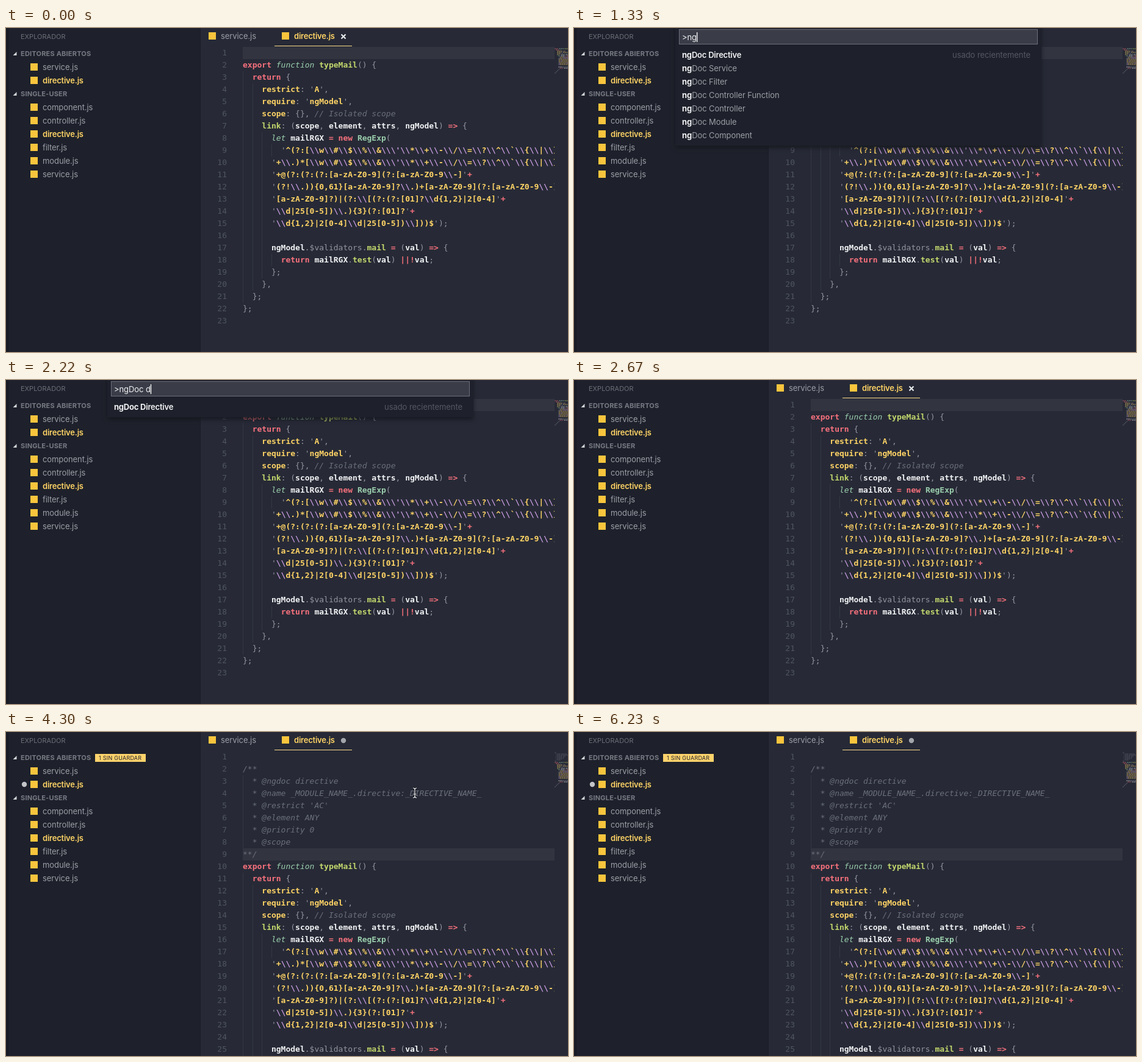
These frames come from a looping animation (921x532 px, 6.35 s). An HTML page:

```html
<!DOCTYPE html>
<html lang="es">
<head>
<meta charset="utf-8">
<title>Editor</title>
<style>
html, body { margin: 0; width: 100%; height: 100%; overflow: hidden; background: #272a36; }
svg { display: block; width: 921px; height: 532px; }
text { white-space: pre; }
.ui { font: 13px Inter, sans-serif; letter-spacing: -.08px; fill: #9c9ea6; }
.on { font-weight: 600; letter-spacing: -.22px; }
.cap { font: 11px Inter, sans-serif; fill: #6c6f78; }
.head { font: 700 11px Inter, sans-serif; letter-spacing: .2px; fill: #777a83; }
.badge { font: 9px Inter, sans-serif; letter-spacing: .25px; fill: #22242c; }
.key { font: 11px Inter, "DejaVu Sans", sans-serif; fill: #e4e5e8; text-anchor: middle; }
.code { font: 13px "DejaVu Sans Mono", monospace; }
.num { fill: #505462; text-anchor: end; }
</style>
</head>
<body>
<svg id="stage" viewBox="0 0 921 532" xmlns="http://www.w3.org/2000/svg">
  <defs>
    <clipPath id="view"><rect x="386" y="31" width="513" height="501"/></clipPath>
    <filter id="shade" x="-10%" y="-30%" width="120%" height="180%" color-interpolation-filters="sRGB">
      <feDropShadow dx="0" dy="4" stdDeviation="3.5" flood-color="#15171e" flood-opacity=".9"/>
    </filter>
  </defs>
  <rect width="921" height="532" fill="#272a36"/>
  <rect width="319" height="532" fill="#1e212b"/>
  <rect width="4.5" height="532" fill="#191b24"/>
  <rect x="318" width="1" height="532" fill="#1a1d26"/>
  <g id="side"></g>
  <g id="tabs"></g>
  <g id="editor"></g>
  <g id="caret"></g>
  <g id="palette"></g>
  <g id="mouse"></g>
</svg>
<script>
const LOOP = 6350;
const COL = 7.826, LEFT = 388, ROW = 20;
const C = {
  red: '#f7717d', green: '#9bcfae', lime: '#c3d76c', yellow: '#ffd466',
  white: '#f1f2f4', gray: '#9396a0', purple: '#c79be0', note: '#6b6f7b'
};

const code = String.raw`
export function typeMail() {
  return {
    restrict: 'A',
    require: 'ngModel',
    scope: {}, // Isolated scope
    link: (scope, element, attrs, ngModel) => {
      let mailRGX = new RegExp(
        '^(?:[\\w\\#\\$\\%\\&\\\'\\*\\+\\-\\/\\=\\?\\^\\~\\{\\|\\}
      '+\\.)*[\\w\\#\\$\\%\\&\\\'\\*\\+\\-\\/\\=\\?\\^\\~\\{\\|\\}
      '+@(?:(?:(?:[a-zA-Z0-9](?:[a-zA-Z0-9\\-]'+
      '(?!\\.)){0,61}[a-zA-Z0-9]?\\.)+[a-zA-Z0-9](?:[a-zA-Z0-9\\-]
      '[a-zA-Z0-9]?)|(?:\\[(?:(?:[01]?\\d{1,2}|2[0-4]'+
      '\\d|25[0-5])\\.){3}(?:[01]?'+
      '\\d{1,2}|2[0-4]\\d|25[0-5])\\]))$');

      ngModel.$validators.mail = (val) => {
        return mailRGX.test(val) ||!val;
      };
    },
  };
};
`.replace(/~/g, '\x60').split('\n');

const doc = `/**
  * @ngdoc directive
  * @name _MODULE_NAME_.directive:_DIRECTIVE_NAME_
  * @restrict 'AC'
  * @element ANY
  * @priority 0
  * @scope
**/`.split('\n');

const documented = [code[0], ...doc, ...code.slice(1)];

const items = [
  ['ngDoc Directive'], ['ngDoc Service'], ['ngDoc Filter'],
  ['ngDoc Controller Function'], ['ngDoc Controller'],
  ['ESLint: Fix all auto-fixable Problems'],
  ['ngDoc Module'], ['ngDoc Component'],
  ['Preferencias: Tema de color', 'Preferences: Color Theme',
    [['⌘', 662, 22], ['K', 685, 19], ['⌘', 706, 22], ['T', 729, 19]]],
  ['Dar formato al documento', 'Format Document',
    [['⌃', 685, 21], ['⌥', 707, 21], ['B', 729, 19]]]
];

const $ = id => document.getElementById(id);
const esc = s => s.replace(/&/g, '&amp;').replace(/</g, '&lt;');
const text = (x, y, s, cls, extra = '') =>
  `<text x="${x}" y="${y}" class="${cls}" ${extra}>${s}</text>`;
const rect = (x, y, w, h, fill, extra = '') =>
  `<rect x="${x}" y="${y}" width="${w}" height="${h}" fill="${fill}" ${extra}/>`;
const dot = (x, y, r, fill) => `<circle cx="${x}" cy="${y}" r="${r}" fill="${fill}"/>`;

function wordColor(word, isKey) {
  if (/^(export|return|new)$/.test(word)) return C.red;
  if (/^(function|let|RegExp)$/.test(word)) return C.green;
  if (/^(typeMail|link|mail|test)$/.test(word)) return C.lime;
  if (word[0] === '$') return C.gray;
  return isKey ? C.yellow : C.white;
}

// Splits a line into [text, colour, bold, italic] parts.
function tokens(line) {
  if (/^\s*(\/\*|\*)/.test(line)) return [[line, C.note, false, true]];
  const out = [];
  const rule = /(\/\/.*)|('(?:\\.|[^'\\])*'?)|(\$?\w+)(?=(:)?)|(=>|\|\||[=!+])|\s+|./g;
  for (const [all, note, str, word, colon, op] of line.matchAll(rule)) {
    if (note) out.push([all, C.note, false, true]);
    else if (str) {
      for (const part of str.split(/((?:\\.)+|^'|'$)/)) {
        if (!part) continue;
        const color = part === "'" ? C.gray : part[0] === '\\' ? C.purple : C.yellow;
        out.push([part, color, color !== C.gray]);
      }
    } else if (word) {
      const slanted = word === 'function' || word === 'let';
      const color = wordColor(word, colon);
      out.push([all, color, !slanted && color !== C.gray, slanted]);
    } else out.push([all, op ? C.red : C.gray, !!op]);
  }
  return out;
}

function drawEditor(lines, current) {
  let body = '', nums = '', guides = '', mini = '';
  lines.forEach((line, i) => {
    const y = 31 + i * ROW;
    const indent = line ? line.search(/\S/) : (i && lines[i + 1] ? 6 : 0);
    for (let c = 0; c < indent; c += 2)
      guides += rect(Math.round(LEFT + c * COL), y, 1, ROW, '#343843');
    nums += text(362, y + 14, i + 1, 'code num');
    let col = 0, spans = '';
    for (const [s, color, bold, slanted] of tokens(line)) {
      spans += `<tspan fill="${color}"${bold ? ' font-weight="700"' : ''}` +
        `${slanted ? ' font-style="italic"' : ''}>${esc(s)}</tspan>`;
      for (const run of s.matchAll(/\S+/g)) {
        const x = 899 + col + run.index;
        if (x < 921) mini += `<path d="M${x} ${32 + i * 2}h${run[0].length}" stroke="${color}"/>`;
      }
      col += s.length;
    }
    if (line) body += text(LEFT, y + 14, spans, 'code');
  });
  return rect(LEFT, 31 + current * ROW, 511, ROW, '#323540') + guides + nums +
    `<g clip-path="url(#view)">${body}</g>` +
    `<g opacity=".75" stroke-width="1" stroke-dasharray=".7 .3 1.4 .6">${mini}</g>`;
}

const file = (x, y, name, active) =>
  rect(x, y - 6, 12, 12, '#f9c53d') +
  text(x + 20, y + 4.5, name, active ? 'ui on' : 'ui', active ? `style="fill:${C.yellow}"` : '');

function drawSide(dirty, badge) {
  const arrow = y => `<path d="M17.5 ${y - 3}v6h-6z" fill="#d5d6da"/>`;
  let s = text(24, 18, 'EXPLORADOR', 'cap') +
    arrow(42) + text(24, 46, 'EDITORES ABIERTOS', 'head') +
    arrow(108) + text(24, 112, 'SINGLE-USER', 'head') +
    file(40, 64, 'service.js') + file(40, 86, 'directive.js', true);
  ['component', 'controller', 'directive', 'filter', 'module', 'service'].forEach((n, i) =>
    s += file(40, 130 + 22 * i, n + '.js', n === 'directive'));
  if (dirty) s += dot(30, 86, 4.2, '#c3c4c8');
  if (badge) s += rect(146, 36, 83, 13, '#ffd36b') + text(152, 46, '1 SIN GUARDAR', 'badge');
  return s;
}

const drawTabs = dirty =>
  file(332, 13, 'service.js') + file(452, 13, 'directive.js', true) +
  rect(440, 29, 127, 1, '#ffdc8c') +
  (dirty ? dot(553, 14, 4.2, '#a3a5ab')
    : '<path d="M549.5 10.5l7 7m0-7l-7 7" stroke="#f1f2f4" stroke-width="2"/>');

function drawPalette(query, caret) {
  const rows = items.filter(([s]) => s.toLowerCase().startsWith(query.toLowerCase()));
  const n = query.length;
  let y = 33, list = '';
  rows.forEach(([label, detail, keys], i) => {
    const hit = n ? `<tspan font-weight="700" fill="${C.white}">${label.slice(0, n)}</tspan>` : '';
    list += text(177, y + 15.5, hit + label.slice(n), i ? 'ui' : 'ui on',
      i ? '' : `style="fill:${C.white}"`);
    if (!i) list += text(748, y + 15.5, 'usado recientemente', 'ui',
      'text-anchor="end" style="fill:#555862"');
    if (detail) list += text(177, y + 35.5, detail, 'ui', 'style="fill:#686b75"');
    for (const [k, x, w] of keys || [])
      list += rect(x, y + 3, w, 18, '#2c2f39', 'rx="3"') + text(x + w / 2, y + 16, k, 'key');
    y += detail ? 44 : 22;
  });
  $('palette').innerHTML =
    rect(166, -8, 600, y + 14, '#1e212b', 'filter="url(#shade)"') +
    rect(172.5, 2.5, 587, 24, '#3a3d48', 'stroke="#6d707a"') +
    text(177, 19.5, '>' + query, 'ui', `id="query" style="fill:${C.white}"`) + list;
  if (caret)
    $('palette').innerHTML += rect(177 + $('query').getComputedTextLength(), 7, 1.3, 16, '#fff');
}

function drawMouse([x, y]) {
  const side = s => `M${x + 3 * s} ${y - 8}q${-3 * s} 0 ${-3 * s} 2.5v11q0 2.5 ${3 * s} 2.5`;
  const d = `${side(-1)}${side(1)}M${x - 2} ${y + 2}h4`;
  return `<g fill="none"><path d="${d}" stroke="#14161c" stroke-width="3"/>` +
    `<path d="${d}" stroke="#f4f4f6" stroke-width="1.2"/></g>`;
}

// The pointer darts in from below, rests, then leaves at the lower right.
function mouseAt(t) {
  if (t < 3860 || t >= 5190) return null;
  if (t < 4000) return [590, 484];
  if (t < 4300) return [675, 101];
  const p = Math.floor((t - 4300) / 148) / 5;
  return p > 1 ? null : [670 + 240 * p, 100 + 425 * p ** 1.5];
}

function queryAt(t) {
  if (t < 600 || t >= 2670) return null;
  const full = 'ngDoc d';
  if (t < 1180) return '';
  if (t < 1920) return full.slice(0, Math.min(4, 1 + Math.floor((t - 1180) / 146.6)));
  return full.slice(0, Math.min(7, 5 + Math.floor((t - 1920) / 150)));
}

function caretOn(t) {
  const flips = [2810, 3260, 3710, 4300, 4740, 5190, 5790, 6230];
  return flips.filter(f => t >= f).length % 2 === 1;
}

const last = {};
function update(id, key, paint) {
  if (last[id] === key) return;
  last[id] = key;
  const s = paint();
  if (s !== undefined) $(id).innerHTML = s;
}

function draw(t) {
  const dirty = t >= 2810, badge = t >= 2960;
  const query = queryAt(t), blink = t >= 740, mouse = mouseAt(t), caret = caretOn(t);
  update('side', `${dirty}${badge}`, () => drawSide(dirty, badge));
  update('tabs', `${dirty}`, () => drawTabs(dirty));
  update('editor', `${dirty}`, () => dirty ? drawEditor(documented, 8) : drawEditor(code, 0));
  update('caret', `${caret}`, () => caret ? rect(411, 191, 2, 20, '#fff') : '');
  update('palette', `${query}|${blink}`, () => query === null ? '' : drawPalette(query, blink));
  update('mouse', `${mouse}`, () => mouse ? drawMouse(mouse) : '');
}

const start = performance.now();
function tick() {
  draw((performance.now() - start) % LOOP);
  requestAnimationFrame(tick);
}
tick();
</script>
</body>
</html>
```
